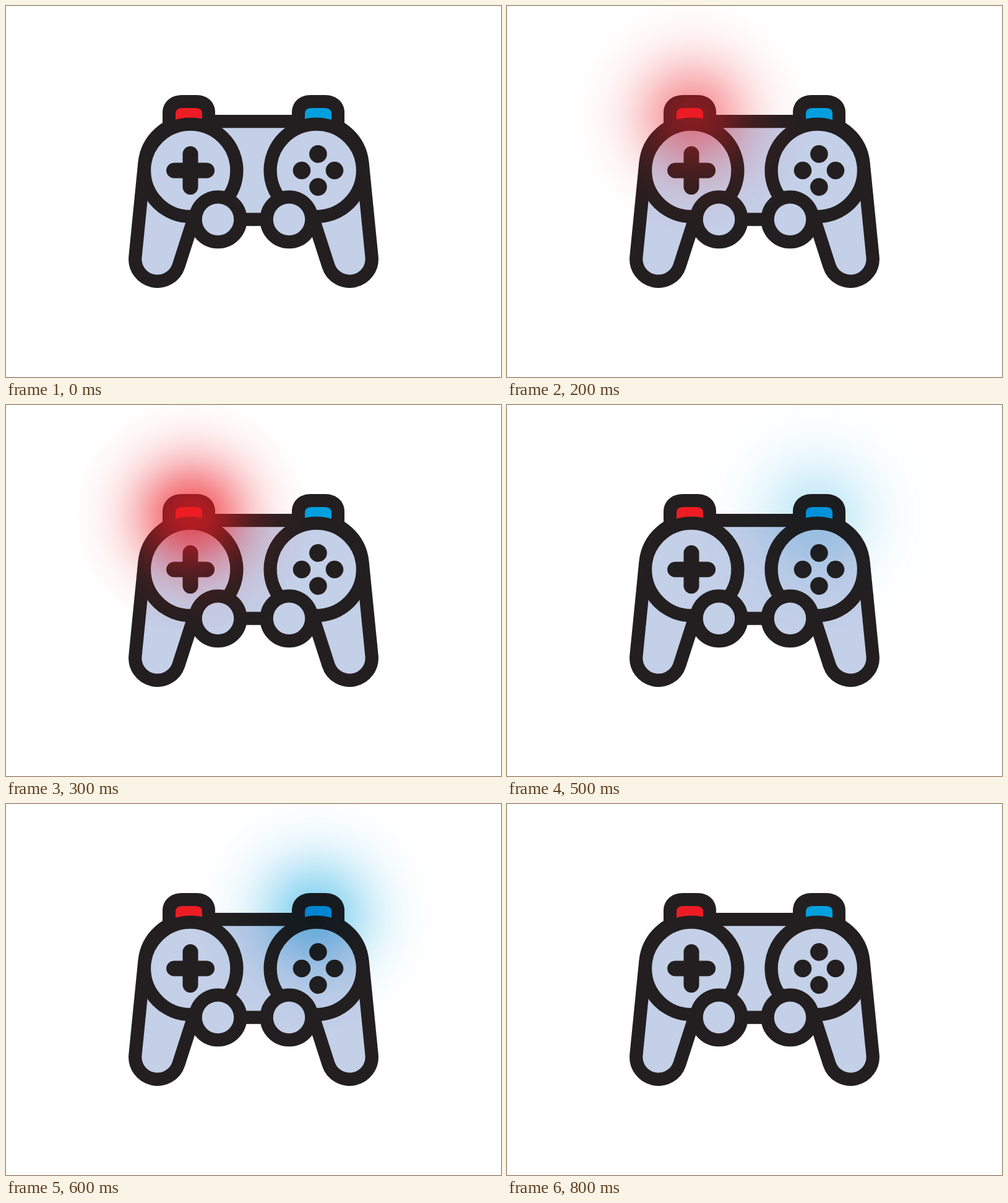
Recreate the animation shown at these times as an HTML page. Size 800 by 600 pixels, loop 900 ms.

```html
<!DOCTYPE html>
<html lang="en">
<head>
<meta charset="utf-8">
<title>Game controller</title>
<style>
  html, body { margin: 0; width: 100%; height: 100%; overflow: hidden; background: #fff; }
  svg { display: block; width: 100vw; height: 100vh; }
  .line { fill: #c4cfe8; stroke: #231f20; stroke-width: 21.3; stroke-linejoin: round; }
  .ink { fill: #231f20; }
  .pad { stroke: #231f20; stroke-width: 25; stroke-linecap: round; }
  .glow { opacity: 0; }
  #blue { mix-blend-mode: multiply; }
</style>
</head>
<body>
<svg viewBox="0 0 800 600">
  <defs>
    <radialGradient id="redGlow"></radialGradient>
    <radialGradient id="blueGlow"></radialGradient>
    <path id="shell" class="line" d="M401 186.6H298.3A74.6 74.6 0 0 0 224 253.7L208.9 405.6A36 36 0 0 0 279 420.2L303.1 345.2H401"/>
    <!-- shoulder button takes its colour from the use element -->
    <g id="controls">
      <path class="ink" d="M253 200V172C253 156 266 144 284 144H308C326 144 338 156 338 172V200Z"/>
      <path fill="currentColor" d="M274 195V174Q274 165 286 165H305Q317 165 317 174V195Z"/>
      <circle class="line" cx="298.2" cy="265.8" r="74.7"/>
      <circle class="line" cx="342.5" cy="345.2" r="36.4"/>
    </g>
  </defs>
  <rect width="800" height="600" fill="#fff"/>
  <use href="#shell"/>
  <use href="#shell" transform="matrix(-1 0 0 1 800 0)"/>
  <use href="#controls" color="#ed1c24"/>
  <use href="#controls" color="#00a0df" transform="matrix(-1 0 0 1 800 0)"/>
  <path class="pad" d="M298 239.3V292.6M271.6 266H324.6"/>
  <g class="ink">
    <circle cx="504.4" cy="239.4" r="14.3"/>
    <circle cx="478" cy="266" r="14.3"/>
    <circle cx="531" cy="266" r="14.3"/>
    <circle cx="504.4" cy="292.6" r="14.3"/>
  </g>
  <circle id="red" class="glow" cx="300" cy="179" r="190" fill="url(#redGlow)"/>
  <circle id="blue" class="glow" cx="500" cy="179" r="190" fill="url(#blueGlow)"/>
</svg>
<script>
  const RADIUS = 190, SPREAD = 92, PEAK = 0.72, STOPS = 20;

  function fillGradient(id, color) {
    const gradient = document.getElementById(id);
    for (let i = 0; i <= STOPS; i++) {
      const distance = i / STOPS * RADIUS;
      const alpha = i === STOPS ? 0 : PEAK * Math.exp(-((distance / SPREAD) ** 2));
      const stop = document.createElementNS("http://www.w3.org/2000/svg", "stop");
      stop.setAttribute("offset", i / STOPS);
      stop.setAttribute("stop-color", color);
      stop.setAttribute("stop-opacity", alpha.toFixed(4));
      gradient.append(stop);
    }
  }

  // One opacity per 100 ms step
  function flash(id, steps) {
    const frames = [...steps, 0].map((opacity, i) =>
      ({ opacity, offset: i / steps.length, easing: "step-end" }));
    document.getElementById(id).animate(frames,
      { duration: steps.length * 100, iterations: Infinity });
  }

  fillGradient("redGlow", "#ed1c24");
  fillGradient("blueGlow", "#00a0df");
  flash("red", [0, 0.33, 0.67, 1, 0, 0, 0, 0, 0]);
  flash("blue", [0, 0, 0, 0, 0, 0.33, 0.67, 1, 0]);
</script>
</body>
</html>
```
